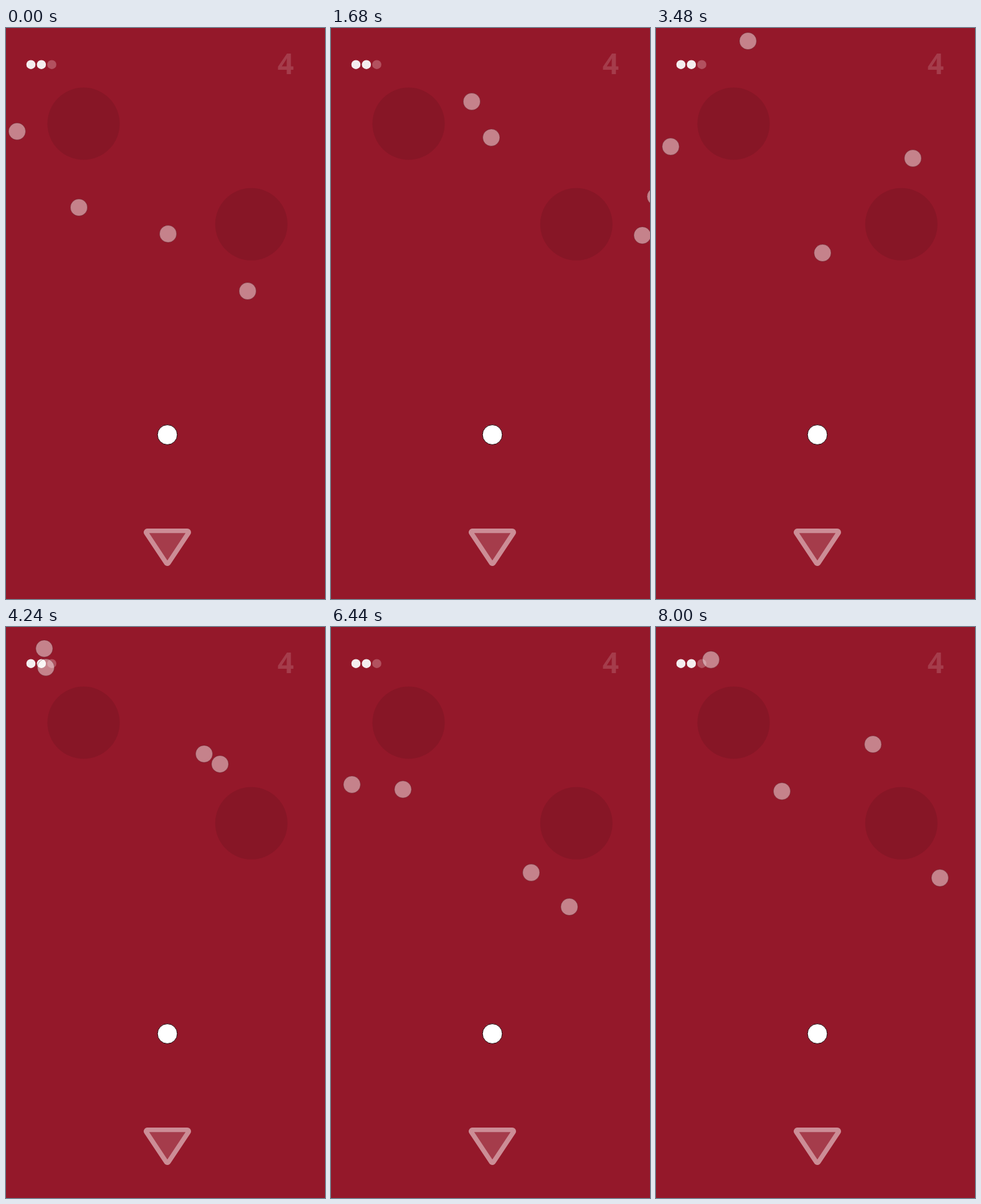
Animation, 512 px wide and 916 px high, one loop 8040 ms. Source, as an HTML page:

```html
<!DOCTYPE html>
<html lang="en">
<head>
<meta charset="utf-8">
<title>Orbits</title>
<style>
  html, body { margin: 0; height: 100%; overflow: hidden; background: #94182a; }
  svg { display: block; width: 100vw; height: 100vh; }
  text { font: bold 46px "Open Sans", "Noto Sans", sans-serif; }
</style>
</head>
<body>
<svg viewBox="0 0 512 916">
  <g fill="#871626">
    <circle cx="124.5" cy="153.5" r="58"/>
    <circle cx="393.8" cy="314.8" r="58"/>
  </g>
  <g fill="#f4eeef">
    <circle cx="40" cy="58.7" r="7.3"/>
    <circle cx="56.8" cy="58.7" r="7.3"/>
    <circle cx="73.5" cy="58.7" r="7.3" fill="#b2515f"/>
  </g>
  <text x="449" y="74" text-anchor="middle" fill="#a53c4b">4</text>
  <path d="M227 809H291L259 857Z" fill="#cc8d96" stroke="#cc8d96" stroke-width="12" stroke-linejoin="round"/>
  <path d="M229.8 810.3H288.2L259 854.3Z" fill="#a53c4b"/>
  <circle cx="259" cy="652.5" r="15.9" fill="#fff" stroke="#1e0409"/>
  <g id="balls" fill="#fff" fill-opacity=".46" stroke="#4a0c15" stroke-opacity=".55" stroke-width=".7"></g>
</svg>
<script>
  const LOOP = 8040, STEP = 40;
  // Degrees and degrees per millisecond
  const fast = { start: 173.4, speed: 0.0996 };
  const slow = { start: 93.2, speed: -0.0498 };
  const orbits = [
    { x: 124.5, y: 153.5, r: 107.4, ...fast },
    { x: 124.5, y: 153.5, r: 134.6, ...slow },
    { x: 393.8, y: 314.8, r: 134.6, ...fast },
    { x: 393.8, y: 314.8, r: 107.4, ...slow }
  ];

  const group = document.getElementById("balls");
  for (const orbit of orbits) {
    orbit.ball = document.createElementNS(group.namespaceURI, "circle");
    orbit.ball.setAttribute("r", 13.7);
    group.append(orbit.ball);
  }

  let origin;
  function draw(now) {
    origin ??= now;
    const t = Math.floor((now - origin) % LOOP / STEP) * STEP;
    for (const { x, y, r, start, speed, ball } of orbits) {
      const angle = (start + speed * t) * Math.PI / 180;
      ball.setAttribute("cx", x + r * Math.cos(angle));
      ball.setAttribute("cy", y + r * Math.sin(angle));
    }
    requestAnimationFrame(draw);
  }
  requestAnimationFrame(draw);
</script>
</body>
</html>
```
